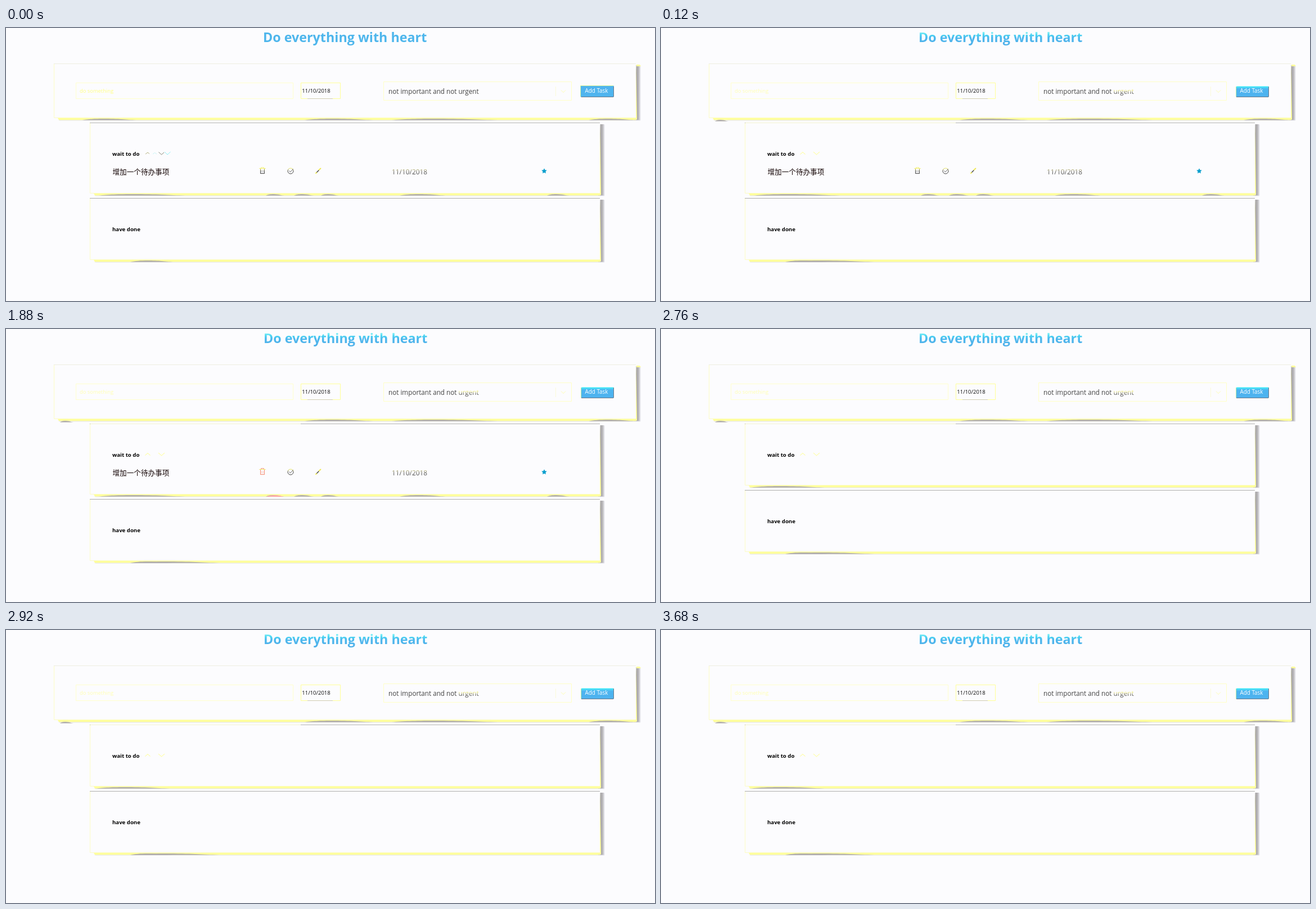
An HTML page that plays this animation: 1154 by 485 pixels, repeating every 4600 ms.

```html
<!DOCTYPE html>
<html lang="en">
<head>
<meta charset="utf-8">
<title>Task list</title>
<style>
html, body { margin: 0; width: 100%; height: 100%; overflow: hidden; background: #fcfcfe; }
svg { display: block; width: 1154px; height: 485px; font-family: "Open Sans", "Noto Sans", sans-serif; }
.bold { font-weight: 700; font-size: 9.65px; fill: #000; }
.title { font-weight: 700; font-size: 23.3px; }
.pale { fill: none; stroke: #ffffb0; }
.icon { fill: none; stroke: url(#ink); }
.cjk { font: 500 12.6px "Noto Sans CJK SC", "Noto Sans CJK", sans-serif; fill: #100; }

/* 4600 ms loop, hard cuts */
.first, .rest, .task, .cleared, .idle, .hover, .done, .late { animation: 4.6s step-end infinite; }
.first { animation-name: first; }
.rest { animation-name: rest; }
.task { animation-name: task; }
.cleared { animation-name: cleared; }
.idle { animation-name: idle; }
.hover { animation-name: hover; }
.done { animation-name: done; }
.late { animation-name: late; }
@keyframes first { 0% { opacity: 1 } .8696% { opacity: .67 } 1.7391% { opacity: .33 } 2.6087%, 100% { opacity: 0 } }
@keyframes rest { 0% { opacity: 0 } .8696% { opacity: .33 } 1.7391% { opacity: .67 } 2.6087%, 100% { opacity: 1 } }
@keyframes task { 0% { opacity: 1 } 60%, 100% { opacity: 0 } }
@keyframes cleared { 0% { opacity: 0 } 60%, 100% { opacity: 1 } }
@keyframes idle { 0% { opacity: 1 } 28.6957%, 100% { opacity: 0 } }
@keyframes hover { 0% { opacity: 0 } 28.6957%, 100% { opacity: 1 } }
@keyframes done { 0% { transform: none } 60%, 100% { transform: translateY(-16px) } }
@keyframes late { 0% { opacity: 0 } 63.4783%, 100% { opacity: 1 } }
</style>
</head>
<body>
<svg viewBox="0 0 1154 485">
  <defs>
    <linearGradient id="sky" gradientUnits="userSpaceOnUse" x1="0" y1="7" x2="0" y2="27">
      <stop stop-color="#8cf4f6"/><stop offset=".25" stop-color="#4cd6f2"/><stop offset=".5" stop-color="#4cb8ee"/><stop offset="1" stop-color="#50b2ea"/>
    </linearGradient>
    <linearGradient id="btn" x1="0" y1="0" x2="0" y2="1">
      <stop stop-color="#45f0fa"/><stop offset=".25" stop-color="#4cb4f0"/><stop offset="1" stop-color="#4fb2ee"/>
    </linearGradient>
    <linearGradient id="ink" gradientUnits="userSpaceOnUse" x1="0" y1="248" x2="0" y2="254">
      <stop stop-color="#f6f680"/><stop offset=".3" stop-color="#e0dc60"/><stop offset="1" stop-color="#444"/>
    </linearGradient>
    <linearGradient id="worn" gradientUnits="userSpaceOnUse" x1="0" y1="109" x2="0" y2="115">
      <stop stop-color="#f8f890"/><stop offset=".4" stop-color="#e4e088"/><stop offset="1" stop-color="#555"/>
    </linearGradient>
    <linearGradient id="wornDate" gradientUnits="userSpaceOnUse" x1="0" y1="250" x2="0" y2="256">
      <stop stop-color="#dcd88c"/><stop offset=".4" stop-color="#a8a480"/><stop offset="1" stop-color="#555"/>
    </linearGradient>
    <linearGradient id="side">
      <stop stop-color="#a8a6a6"/><stop offset=".6" stop-color="#b0aeb0"/><stop offset="1" stop-color="#ececf2"/>
    </linearGradient>
    <g id="bin">
      <path d="M450.500 249.500H461.500M453.500 249V247.800H458.500V249M452.500 250V258.500H459.500V250"/>
      <path d="M454.700 252V257M457.300 252V257" opacity=".45"/>
    </g>
  </defs>

  <g class="first"><text class="title" x="457" y="25" fill="#4eb6ec">Do everything with heart</text></g>
  <g class="rest"><text class="title" x="458" y="25" fill="url(#sky)">Do everything with heart</text></g>

  <g id="form"></g>
  <g class="first" id="formFirst"></g>
  <g class="rest" id="formRest"></g>
  <g class="pale">
    <path d="M124.500 97.500H510.500V125.500H124.500Z" style="stroke:#ffffcc"/>
    <path d="M524.500 97.500H594.500V125.500H524.500Z" style="stroke:#ffff96"/>
    <path d="M671.500 95.500H1005.500V128.500H671.500Z" style="stroke:#ffffc6"/>
    <path d="M987 110.500L991 114.500L995 110.500"/>
    <path d="M977.500 104V121" style="stroke:#fafad8"/>
  </g>
  <path d="M536 125.500H581" stroke="#d0ccb0"/>
  <g font-size="9.350">
    <text class="first" x="131" y="115" fill="#ffff80">do something</text>
    <text class="rest" x="131" y="115" fill="#ffffb0">do something</text>
  </g>
  <text x="526.300" y="115" font-size="9.500" fill="#0c0c0c">11/10/2018</text>
  <g font-size="11.700" fill="#444">
    <text class="first" x="680" y="117">not important and not urgent</text>
    <text class="rest" x="680" y="117">not important and not <tspan fill="url(#worn)">urgent</tspan></text>
  </g>

  <g class="first">
    <rect x="1021.500" y="102" width="59.500" height="21" rx="2" fill="#4fb4ee"/>
    <path d="M1021.500 122V102.500H1080" fill="none" stroke="#d8f49c"/>
  </g>
  <g class="rest">
    <rect x="1022.500" y="103.500" width="58.500" height="19.500" rx="2" fill="url(#btn)"/>
    <path d="M1022.500 122V104" fill="none" stroke="#c4eea8"/>
  </g>
  <path class="late" d="M1024 107.500H1079" stroke="#54c4f4"/>
  <path d="M1023 122.500H1079Q1080.500 122.500 1080.500 121V104" fill="none" stroke="#68788a"/>
  <text x="1029.500" y="115" font-size="9.900" fill="#fff">Add Task</text>

  <g class="task">
    <g id="wait"></g>
    <g class="hover"><path d="M463 298Q469 295 480 295.200Q488 296 494 298Z" fill="#ffa9a4"/></g>
    <text class="cjk" x="189.500" y="260">增加一个待办事项</text>
    <use href="#bin" class="icon idle"/>
    <use href="#bin" class="hover" fill="none" stroke="#f58a70"/>
    <path d="M450.500 249.500H461.500" class="pale" style="stroke:#f4f070"/>
    <circle class="icon" cx="506" cy="254" r="5"/>
    <path d="M503.500 253.500L505.500 256L510.500 250.500" fill="none" stroke="#666"/>
    <path d="M552 257L556.500 252.500" stroke="#444" stroke-width="1.400"/>
    <path d="M550.500 258.500L552.500 256.500M556 252.500L560 249" stroke="#eee850" stroke-width="1.800"/>
    <text x="686" y="259.500" font-size="11.900" fill="url(#wornDate)">11/10/2018</text>
    <path id="star" fill="#0a9fce"/>
  </g>
  <g class="cleared" id="empty"></g>
  <path class="rest" d="M150 168.500H524" stroke="#f2f2d0"/>

  <text class="bold" x="189" y="227">wait to do</text>
  <g class="first" fill="none">
    <path d="M248 224L252 221L255 223.500" stroke="#b4b080"/>
    <path d="M261 224L264.500 221.500L268 224" stroke="#c8f4f4"/>
    <path d="M271.500 220.500L276.500 225L281 221" stroke="#888878"/>
    <path d="M282 220L287 225L292.500 220" stroke="#90eef4"/>
  </g>
  <g class="rest pale" style="stroke:#ffff84">
    <path d="M247.500 224.500L252 220.500L256.500 224.500M271 220L276.500 225L282 220"/>
  </g>

  <g class="done">
    <g id="have"></g>
    <g class="rest" id="haveRest"></g>
    <text class="bold" x="189" y="361">have done</text>
  </g>
</svg>
<script>
const put = (id, html) => document.getElementById(id).innerHTML = html;

// grey swell showing through the yellow edge below a card
const swell = (b, [from, to]) => {
  const w = to - from, x = k => from + w * k;
  return `<path fill="#b2afac" d="M${from} ${b + 3.8}C${x(.12)} ${b + 1.8} ${x(.2)} ${b + 1} ${x(.42)} ${b + 1}` +
    `C${x(.7)} ${b + 1.2} ${x(.8)} ${b + 3.2} ${to} ${b + 3.8}Z"/>`;
};
const swells = (b, list) => list.map(s => swell(b, s)).join("");

const card = (x, y, r, b, top, list) => `
  <path fill="#e4e4ec" d="M${x + 8} ${b + 3}H${r + 8}V${b + 4.6}H${x + 10}Z"/>
  <path fill="url(#side)" d="M${r + .5} ${y + 3}H${r + 7}Q${r + 8.5} ${y + 3} ${r + 8.5} ${y + 5}V${b + 3.5}H${r - 3}Z"/>
  <path fill="#ffff9c" d="M${x + 7} ${b}H${r}V${y + 2}L${r + 2} ${b + 2}L${r} ${b + 3.6}H${x + 9}Z"/>
  ${swells(b, list)}
  <path fill="#fcfcfe" d="M${x} ${y}H${r}V${b}H${x}Z"/>
  <path fill="none" stroke="#fcfcc4" d="M${x + .5} ${y}V${b - .5}H${r}"/>
  <path stroke="${top}" d="M${x} ${y + .5}H${r}"/>`;

put("form", card(85, 63, 1120, 160, "#eeeee0", [[530, 658], [685, 882], [1036, 1122]]) +
  '<path fill="#ffff9c" d="M1121 65H1127L1129 68H1121Z"/>');
put("formFirst", swells(160, [[135, 235]]));
put("formRest", swells(162, [[96, 120]]));
put("wait", card(149, 168, 1056, 294, "#b5b5b1",
  [[164, 325], [462, 495], [512, 548], [560, 592], [700, 785], [962, 1002]]));
put("empty", card(149, 168, 1056, 278, "#b5b5b1", [[159, 296]]));
put("have", card(149, 302, 1056, 412, "#adadab", [[221, 300]]));
put("haveRest", swells(412, [[221, 385]]));

const points = Array.from({ length: 10 }, (_, i) => {
  const a = i * Math.PI / 5 - Math.PI / 2, r = i % 2 ? 2.5 : 5;
  return `${957 + r * Math.cos(a)} ${254.3 + r * Math.sin(a)}`;
});
document.getElementById("star").setAttribute("d", `M${points.join("L")}Z`);
</script>
</body>
</html>
```
